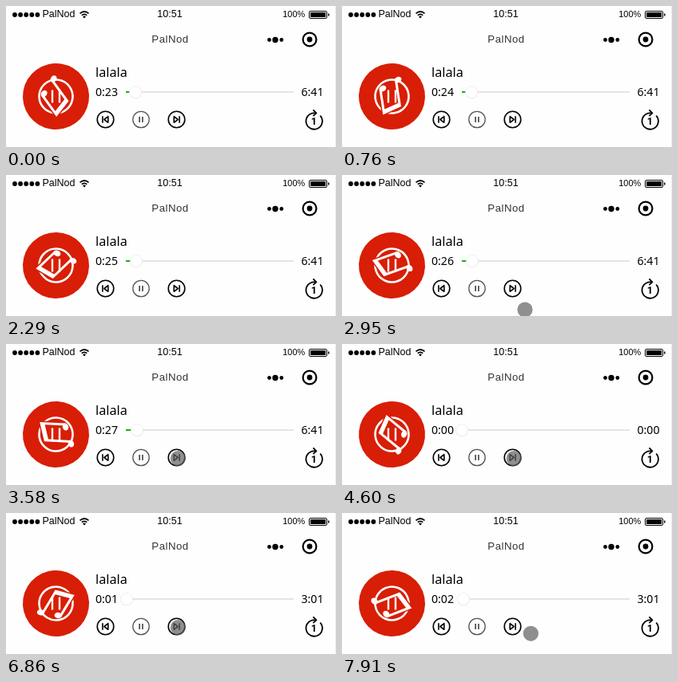
An HTML page for the animation above (8 s loop, 413 by 177 pixels).

```html
<!DOCTYPE html>
<html lang="en">
<head>
<meta charset="utf-8">
<title>Music player</title>
<style>
  html, body { margin: 0; width: 100%; height: 100%; overflow: hidden; background: #fefefe; }
  svg { display: block; width: 413px; height: 177px; }
  .ui { font-family: "Liberation Sans", Arial, sans-serif; }
  .body { font-family: "Noto Sans", "Open Sans", sans-serif; fill: #000; }
  .line { fill: none; stroke: #000; }
</style>
</head>
<body>
<svg viewBox="0 0 413 177">
  <rect width="413" height="177" fill="#fefefe"/>
  <path d="M412.5 0V177" stroke="#ededed"/>

  <g class="ui" id="status">
    <g id="signal"></g>
    <text x="45.5" y="14" font-size="12.5">PalNod</text>
    <g class="line" stroke-width="1.7">
      <path d="M92.5 9.3Q98 4.7 103.5 9.3M94.7 11.7Q98 8.9 101.3 11.7"/>
    </g>
    <path d="M96 13.2Q98 11.7 100 13.2L98 15.4Z"/>
    <text x="205" y="14" font-size="12.5" text-anchor="middle">10:51</text>
    <text x="346.3" y="14" font-size="10.9">100%</text>
    <rect class="line" x="379.5" y="6.5" width="22" height="9" rx="1.5"/>
    <rect x="381" y="8" width="19" height="6"/>
    <path d="M403 9.5h1.5v3h-1.5z"/>
  </g>

  <g id="header">
    <text class="ui" x="205.5" y="46" font-size="13.2" text-anchor="middle" fill="#333" letter-spacing=".5">PalNod</text>
    <circle cx="329.5" cy="42.5" r="2.4"/>
    <circle cx="337" cy="42.5" r="3.7"/>
    <circle cx="344.8" cy="42.5" r="2.4"/>
    <circle class="line" cx="380" cy="42" r="8.4" stroke-width="2.2"/>
    <circle cx="380" cy="42" r="3.4"/>
  </g>

  <g id="disc">
    <circle r="41.5" fill="#d81e06"/>
    <g fill="none" stroke="#fff">
      <circle r="21" stroke-width="2.6"/>
      <path d="M-8 19V-13L13 -19V11" stroke="#d81e06" stroke-width="6"/>
      <path d="M-8 19V-13L13 -19V11" stroke-width="3"/>
      <path d="M-8 -11.5L13 -17.5" stroke-width="5"/>
    </g>
    <g fill="#fff">
      <ellipse cx="-10.6" cy="19.5" rx="4.6" ry="3.6" transform="rotate(-20 -10.6 19.5)"/>
      <ellipse cx="10" cy="11.5" rx="4.6" ry="3.6" transform="rotate(-20 10 11.5)"/>
    </g>
  </g>
  <path d="M58 105.5V121.5M67 105.5V121.5" stroke="#fff" stroke-width="2.4"/>

  <g class="body">
    <text x="112" y="89" font-size="16.2">lalala</text>
    <text id="now" x="112" y="113" font-size="14.1"></text>
    <text id="total" x="397.5" y="113" font-size="14.1" text-anchor="end"></text>
  </g>

  <path d="M150 108H360" stroke="#e4e4e4" stroke-width="2"/>
  <path id="played" stroke="#1aad19" stroke-width="2"/>
  <g id="thumb">
    <circle cy=".6" r="8" fill="#000" opacity=".06"/>
    <circle r="7.5" fill="#fff" stroke="#ececec" stroke-width=".8"/>
  </g>

  <g class="line" stroke-width="1.6" stroke-linejoin="round">
    <g transform="translate(124.5 142.5)">
      <circle r="10.3"/>
      <path d="M-3.6 -4.2V4.2M3.3 -3.8V3.8L-1.6 0Z"/>
    </g>
    <g transform="translate(169 142.5)" stroke="#555" stroke-width="1.3">
      <circle r="10.2"/>
      <path d="M-1.9 -3.6V3.6M1.9 -3.6V3.6" stroke-width="1.8"/>
    </g>
    <g transform="translate(213.5 142.5)">
      <circle r="10.3"/>
      <path d="M3.6 -4.2V4.2M-3.3 -3.8V3.8L1.6 0Z"/>
    </g>
    <g stroke-width="1.8">
      <path d="M393.2 137.6A10.2 10.2 0 1 1 385.5 134.3H388"/>
      <path d="M384.4 130.4L388.4 134.3L384.4 138.2"/>
    </g>
  </g>
  <text x="385.4" y="148.6" font-size="12.5" font-weight="bold" text-anchor="middle" font-family="Roboto, sans-serif">1</text>

  <circle id="cursor" r="9.6" fill="#5f5f5f" opacity=".7"/>
</svg>

<script>
const LOOP = 8000, STEP = 120;
// Screen refreshes come in runs: [first time, count], STEP apart.
const RUNS = [
  [0, 1], [160, 6], [910, 2], [1180, 1], [1330, 2], [1600, 2], [1870, 1], [2020, 2],
  [2290, 3], [2680, 2], [2950, 3], [3340, 3], [3730, 7], [4600, 2], [4870, 2], [5140, 2],
  [5410, 2], [5680, 2], [5960, 4], [6470, 2], [6740, 2], [7010, 2], [7280, 2], [7550, 4]
];
const SKIP_AT = 4080, READY_AT = 5400;
const CURSOR = [[2950, 229, 169], [3190, 218, 149], [3340, 215.3, 143.7], [7400, 215.3, 143.7], [7910, 236.3, 151.3]];

const $ = id => document.getElementById(id);
const clock = s => Math.floor(s / 60) + ":" + String(s % 60).padStart(2, "0");

$("signal").innerHTML = [0, 1, 2, 3, 4]
  .map(i => `<circle cx="${11 + i * 7.1}" cy="11" r="2.9"/>`).join("");

function snap(t) {
  let last = 0;
  for (const [start, count] of RUNS) {
    if (t < start) break;
    last = start + STEP * Math.min(count - 1, Math.floor((t - start) / STEP));
  }
  return last;
}

function song(t) {
  if (t < SKIP_AT) return { now: 23 + Math.floor((t + 470) / 1000), total: 401 };
  if (t < READY_AT) return { now: 0, total: 0 };
  return { now: Math.max(0, Math.floor((t - 5200) / 1000)), total: 181 };
}

function along(points, t) {
  const next = points.findIndex(p => p[0] > t);
  if (next < 0) return points[points.length - 1].slice(1);
  const [a, b] = [points[next - 1], points[next]];
  const k = (t - a[0]) / (b[0] - a[0]);
  return [a[1] + (b[1] - a[1]) * k, a[2] + (b[2] - a[2]) * k];
}

function draw(time) {
  const t = snap(time % LOOP);
  $("disc").setAttribute("transform", `translate(62.5 113.5) rotate(${144 + t * 0.036})`);

  const { now, total } = song(t);
  $("now").textContent = clock(now);
  $("total").textContent = clock(total);
  const x = 150 + (total ? Math.floor(now * 210 / total) : 0);
  $("played").setAttribute("d", `M150 108H${x}`);
  $("thumb").setAttribute("transform", `translate(${x} 108)`);

  const shown = t >= CURSOR[0][0];
  $("cursor").setAttribute("visibility", shown ? "visible" : "hidden");
  if (shown) $("cursor").setAttribute("transform", `translate(${along(CURSOR, t)})`);
}

const begin = performance.now();
function tick() {
  draw(performance.now() - begin);
  requestAnimationFrame(tick);
}
tick();
</script>
</body>
</html>
```
